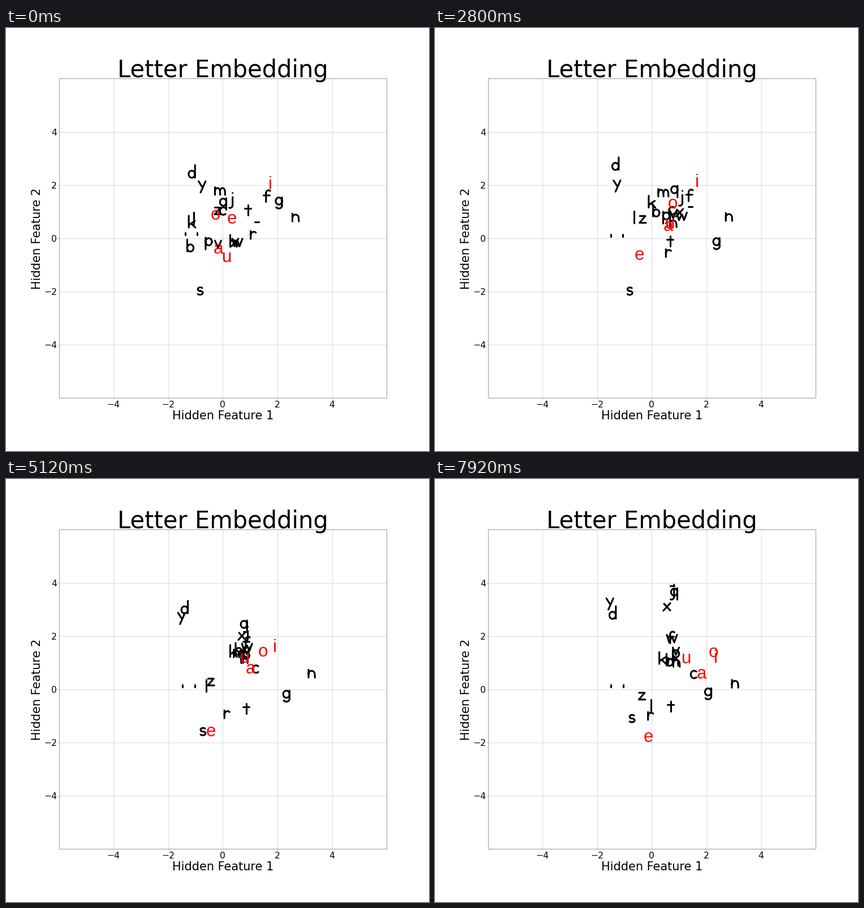
Recreate the animation shown at these times as a matplotlib script. Size 748 by 748 pixels, loop 8 s.

```python
import numpy as np
import matplotlib.pyplot as plt
from matplotlib.animation import FuncAnimation
from matplotlib.patches import PathPatch
from matplotlib.path import Path
from matplotlib.transforms import Affine2D

SIZE, DPI = 748, 88
FRAMES, INTERVAL = 100, 80
KEYS = np.array([0, 20, 51, 99], float)
LEFT, RIGHT, TOP, BOTTOM = 93.6, 673.2, 89.45, 654.15
GREY = "#b0b0b0"

fig = plt.figure(figsize=(SIZE / DPI, SIZE / DPI), dpi=DPI, facecolor="white")
ax = fig.add_axes([0, 0, 1, 1])
ax.set(xlim=(0, SIZE), ylim=(SIZE, 0))
ax.set_axis_off()


def pt(px):
    return px * 72 / DPI


def label(x, y, text, px, **kw):
    style = dict(ha="center", va="baseline", family="DejaVu Sans", color="black")
    return ax.text(x, y, text, fontsize=pt(px), **{**style, **kw})


def rule(x, y, **kw):
    ax.plot(x, y, color=GREY, solid_capstyle="butt", **kw)


def draw_chart():
    for v in range(-4, 5, 2):
        x = LEFT + (v + 6) / 12 * (RIGHT - LEFT)
        y = BOTTOM - (v + 6) / 12 * (BOTTOM - TOP)
        rule([x, x], [TOP, BOTTOM], lw=pt(1.4), alpha=0.35)
        rule([LEFT, RIGHT], [y, y], lw=pt(1.4), alpha=0.35)
        rule([x, x], [BOTTOM, BOTTOM + 2], lw=pt(1))
        rule([LEFT - 2, LEFT], [y, y], lw=pt(1))
        text = str(v).replace("-", "\u2212")
        label(x, 671.3, text, 15.6)
        label(90.3, y + 6.2, text, 15.6, ha="right")
    rule([LEFT, RIGHT, RIGHT, LEFT, LEFT], [TOP, TOP, BOTTOM, BOTTOM, TOP], lw=pt(1.4))
    label(383.4, 86.8, "Letter Embedding", 41.67)
    label(383.4, 692.4, "Hidden Feature 1", 20.83)
    label(60.6, 372.2, "Hidden Feature 2", 20.83, rotation=90, rotation_mode="anchor")


# Pen strokes, relative to the middle of a glyph's baseline, y upwards.
def line(*points):
    return Path(points)


def stem(x, low, high):
    return line((x, high), (x, low))


def bar(y, half):
    return line((-half, y), (half, y))


def arc(cx, cy, rx, ry, start, end):
    a = np.radians(np.linspace(start, end, 30))
    return Path(np.c_[cx + rx * np.cos(a), cy + ry * np.sin(a)])


def arch(left, right):
    """Shoulder rising from one stem and coming down to the baseline."""
    top = arc((left + right) / 2, 7, (right - left) / 2, 6, 180, 0)
    return Path(np.vstack([top.vertices, (right + 0.3, 1)]))


BOWL = arc(0, 7, 5.6, 6.3, 0, 360)
movers = []


def track(place, points):
    """Register a part that glides smoothly through one point per key."""
    points = np.array(points, float)
    movers.append((points, np.gradient(points, KEYS, axis=0), place))


def vowel(char, *points):
    text = label(0, 0, char, 31.4, family="Liberation Sans", color="red", zorder=4)
    track(text.set_position, points)


def letter(points, *strokes):
    patch = PathPatch(Path.make_compound_path(*strokes), fill=False, ec="black",
                      lw=pt(3.1), capstyle="round", joinstyle="round", zorder=3)
    ax.add_patch(patch)
    flip = Affine2D().scale(1, -1)
    track(lambda p: patch.set_transform(flip + Affine2D().translate(*p) + ax.transData), points)


def draw_letters():
    vowel("a", (375.5, 399), (402, 374), (420.5, 347), (471, 353))
    vowel("e", (399, 346), (369.5, 377), (360, 442), (377.5, 465))
    vowel("i", (467, 285), (461.5, 272), (469, 297), (496, 325))
    vowel("o", (370, 339), (400.5, 325), (439.5, 315), (492.5, 315))
    vowel("u", (390.5, 414), (412, 380), (417, 333), (444.5, 326))

    # b, c, d, f, g
    letter([(326, 396), (370.5, 359), (405, 315), (415, 331)], stem(-5.5, 1, 22), BOWL)
    letter([(383.5, 331), (404, 325), (433, 339), (457.5, 353)], arc(0.8, 7.3, 6, 6.6, 50, 310))
    letter([(328.5, 265.5), (322, 262.5), (317, 240), (314, 248)], stem(5.8, 1, 23), BOWL)
    letter([(461, 308), (463, 309), (432, 303), (417, 291)],
           arc(3.3, 16, 4.5, 5, 50, 180), stem(-1.2, 0.5, 16), bar(12, 5.5))
    letter([(482.5, 313), (494, 371), (498, 386), (483, 383.5)],
           BOWL, stem(5.6, -1, 13.5), arc(0, -1, 5.6, 5.2, 215, 360))

    # h, j, k, l, m, n
    letter([(402, 388), (419, 374), (420, 332), (427, 333)], stem(-5.5, 1, 22), arch(-5.5, 5.5))
    letter([(398, 312), (433, 310), (427, 300), (420, 207)],
           stem(2.7, 20, 20.2), stem(2.7, -1, 13), arc(-1.8, -1, 4.5, 5.2, 250, 360))
    letter([(329, 354), (365, 328), (397, 315), (402.5, 328)],
           stem(-5.8, 1, 22), line((5, 13), (-5.3, 6)), line((-1.8, 8.5), (6, 1)))
    letter([(332, 348), (353, 336), (348, 364), (382, 412)], stem(0, 1, 22))
    letter([(378.5, 296), (397, 292), (408, 310), (421, 331)],
           stem(-9, 1, 14.5), arch(-9, 0), arch(0, 8.7))
    letter([(512, 343), (506, 340), (537.5, 347), (530.5, 370)], stem(-5.5, 1, 15), arch(-5.5, 5.5))

    # p, q, r, s, t
    letter([(358.5, 385), (392.5, 357), (420, 325), (426, 316)], stem(-5.5, -6.5, 14.5), BOWL)
    letter([(384, 315), (418.5, 302), (420, 280.5), (423, 207)], stem(5.5, -6.5, 14), BOWL)
    letter([(437, 374), (426.5, 392), (397.5, 419), (381, 427)],
           stem(-4.3, 1, 15), arc(1.2, 7, 5.5, 6.6, 180, 50))
    letter([(343, 472.5), (342, 478.5), (347, 462), (348, 431)],
           arc(0.6, 10.7, 4.4, 3.2, 40, 270), arc(0, 4.2, 5, 3.3, 90, -140))
    letter([(428, 331), (412, 361), (424.5, 409), (417, 411)], stem(0, 0.5, 18.5), bar(12.5, 5.5))

    # v, w, x, y, z
    letter([(375, 390), (411, 360), (424, 318), (426, 312)], line((-5.5, 14), (0, 1), (5.5, 14)))
    letter([(409, 387), (436, 364), (429, 317), (419, 290)],
           line((-9, 14.5), (-5, 1), (0, 11.5), (4, 1), (9, 14.5)))
    letter([(405, 387), (435, 360), (421, 306), (410, 234)],
           line((6, 14.5), (-6.3, 1)), line((-5, 13.5), (6, 1.5)))
    letter([(346.5, 284.5), (331.5, 296), (313.5, 261.5), (309, 224.5)],
           line((-6, 13.5), (0, 4)), line((6.3, 13.5), (-2.5, -6.5)))
    letter([(374.5, 330.5), (371.5, 336.5), (363, 357), (366, 391)],
           line((-5, 13), (4.8, 13), (-5.5, 1), (5.8, 1)))

    # hyphen and quoted space
    letter([(443.5, 343), (464, 330.5), (430, 294), (420, 188.5)], bar(0, 3.5))
    letter([(327.5, 364), (321.5, 366.5), (323, 366), (322, 365.5)], stem(-10.6, -2, 2), stem(10.6, -2, 2))


def update(frame):
    i = min(np.searchsorted(KEYS, frame, side="right"), len(KEYS) - 1) - 1
    h = KEYS[i + 1] - KEYS[i]
    u = (frame - KEYS[i]) / h
    ease = u * u * (3 - 2 * u)
    for p, slope, place in movers:
        bend = u * (1 - u) * h * ((1 - u) * slope[i] - u * slope[i + 1])
        place(p[i] + ease * (p[i + 1] - p[i]) + bend)
    return []


draw_chart()
draw_letters()
anim = FuncAnimation(fig, update, frames=FRAMES, interval=INTERVAL,
                     init_func=lambda: update(0), repeat=True, repeat_delay=0)
plt.show()
```
